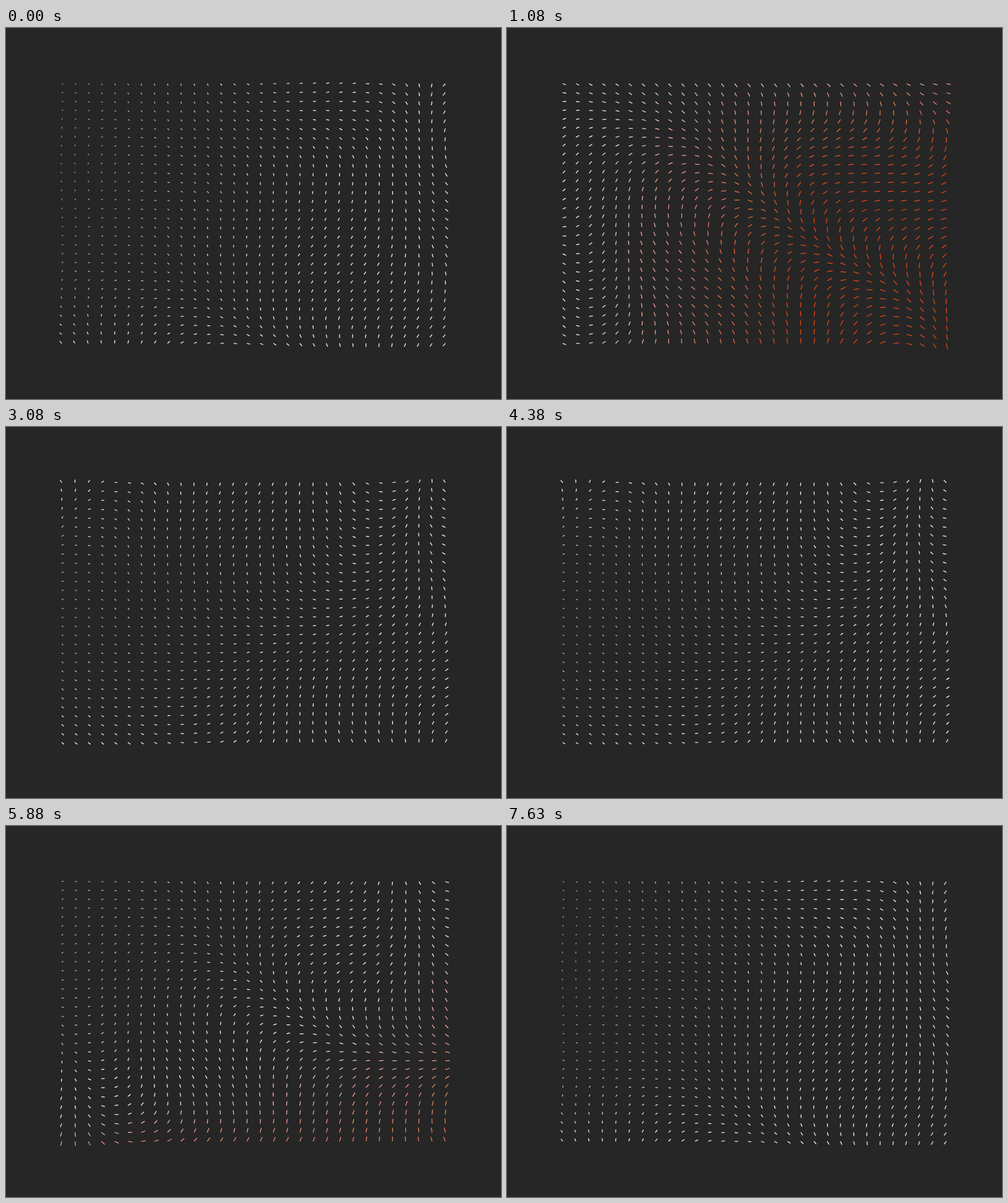
An HTML page that plays this animation: 800x600 px, repeating every 7.68 s.

```html
<!DOCTYPE html>
<html lang="en">
<head>
<meta charset="utf-8">
<title>Flow field</title>
<style>
  html, body { margin: 0; width: 100%; height: 100%; overflow: hidden; background: #262626; }
  svg { display: block; width: 800px; height: 600px; }
</style>
</head>
<body>
<svg id="stage" viewBox="0 0 800 600" fill="none" stroke-width="1.25"></svg>
<script>
const LOOP = 7680, COUNT = 30, MARGIN = 90, WIDTH = 800, HEIGHT = 600;
const { PI, sin, cos, min, max } = Math;

const lerp = (a, b, t) => a + (b - a) * t;
const clamp = (x, lo, hi) => min(hi, max(lo, x));
const smooth = t => t * t * (3 - 2 * t);
const wave = (v, peak, period) => cos(2 * PI * (v - peak) / period);

// Each pose gives the dash heading in degrees down the left, middle and right of the
// field, a ripple across it, and the dash length in px. u and v run from 0 to 1.
const calm = {
  depth: 0,
  left: v => -52 - 30 * v + 62 * wave(v, 0, 0.625),
  middle: v => 20 + 85 * sin(PI * v ** 1.5),
  right: v => 85 + 45 * wave(v, 0, 1),
  ripple: v => 75 * (1 - v) * cos(1.4 * PI * v),
  length: (u, v) => 2.4 + 3.7 * u + 2.4 * (1 - u) * v ** 5
};
const blaze = {
  depth: 0.425,
  left: v => 48 * wave(v, 0.82, 1),
  middle: v => -14 + 110 * wave(v, 0.2, 1.35),
  right: v => 12 + 68 * v + 120 * sin(PI * v ** 0.85) ** 2,
  ripple: v => -68 * sin(PI * v),
  length: (u, v) => 5.8 + sin(PI * u / 2) * (1.4 + 2.1 * (1 - (1 - v) ** 4))
};
const ember = {
  depth: 0.672,
  left: v => 35 - 75 * wave(v, 0.2, 1.4),
  middle: v => 5 + 108 * wave(v, 0.1, 1.4),
  right: v => 15 - 128 * v ** 2 + 75 * sin(PI * v) ** 3,
  ripple: v => -78 * cos(2.2 * (v - 0.45)),
  length: (u, v) => 3 + 3 * u + 4.3 * (1 - u) * v ** 3 + 1.8 * u * smooth(v)
};
const ash = {
  depth: 0.96,
  left: v => 38 - 160 * (1 - v) ** 3.5,
  middle: v => 30 + 88 * wave(v, 0.08, 1.7),
  right: v => -95 - 65 * wave(v, 0.2, 1.2),
  ripple: v => 45 * v ** 3,
  length: (u, v) => 3 + 2.8 * u + 1.9 * (1 - u) * (2 * v - 1) ** 2
};
const poses = [calm, blaze, ember, ash];
const depths = poses.map(p => p.depth);

// Parabola through left, middle and right, plus the ripple.
const heading = (pose, u, v) =>
  pose.left(v) * (1 - u) * (1 - 2 * u) +
  pose.middle(v) * 4 * u * (1 - u) +
  pose.right(v) * u * (2 * u - 1) +
  pose.ripple(v) * sin(2 * PI * u);

// Hermite weights of the poses at a given depth.
function poseWeights(z) {
  const last = depths.length - 1;
  let k = 0;
  while (k < last - 1 && z > depths[k + 1]) k++;
  const span = depths[k + 1] - depths[k], t = (z - depths[k]) / span;
  const weights = depths.map(() => 0);
  const addTangent = (i, amount) => {
    const lo = max(0, i - 1), hi = min(last, i + 1);
    const slope = amount * span / (depths[hi] - depths[lo]);
    weights[hi] += slope;
    weights[lo] -= slope;
  };
  weights[k] += 1 - smooth(t);
  weights[k + 1] += smooth(t);
  addTangent(k, t * (1 - t) ** 2);
  addTangent(k + 1, t * t * (t - 1));
  return weights;
}
const blend = (values, weights) => values.reduce((sum, v, i) => sum + v * weights[i], 0);

const GREY = [150, 150, 150], WHITE = [255, 255, 255], ORANGE = [236, 72, 22];
function tint(length) {
  const [from, to, t] = length < 5
    ? [GREY, WHITE, (length - 2) / 3]
    : [WHITE, ORANGE, (length - 5.9) / 2.7];
  return `rgb(${from.map((c, i) => Math.round(lerp(c, to[i], clamp(t, 0, 1))))})`;
}

const stage = document.getElementById("stage");
const dashes = [];
for (let row = 0; row < COUNT; row++) {
  for (let col = 0; col < COUNT; col++) {
    const u = col / (COUNT - 1), v = row / (COUNT - 1);
    const path = document.createElementNS("http://www.w3.org/2000/svg", "path");
    stage.appendChild(path);
    dashes.push({
      path,
      x: lerp(MARGIN, WIDTH - MARGIN, u),
      y: lerp(MARGIN, HEIGHT - MARGIN, v),
      headings: poses.map(p => heading(p, u, v)),
      lengths: poses.map(p => p.length(u, v))
    });
  }
}

function draw(time) {
  const weights = poseWeights(sin(PI * (time % LOOP) / LOOP));
  for (const { path, x, y, headings, lengths } of dashes) {
    const angle = blend(headings, weights) * PI / 180;
    const length = clamp(blend(lengths, weights), 1.5, 9.6);
    const dx = length * cos(angle), dy = length * sin(angle);
    path.setAttribute("d", `M${x.toFixed(2)} ${y.toFixed(2)}l${dx.toFixed(2)} ${dy.toFixed(2)}`);
    path.setAttribute("stroke", tint(length));
  }
}

const start = performance.now();
function tick() {
  draw(performance.now() - start);
  requestAnimationFrame(tick);
}
tick();
</script>
</body>
</html>
```
